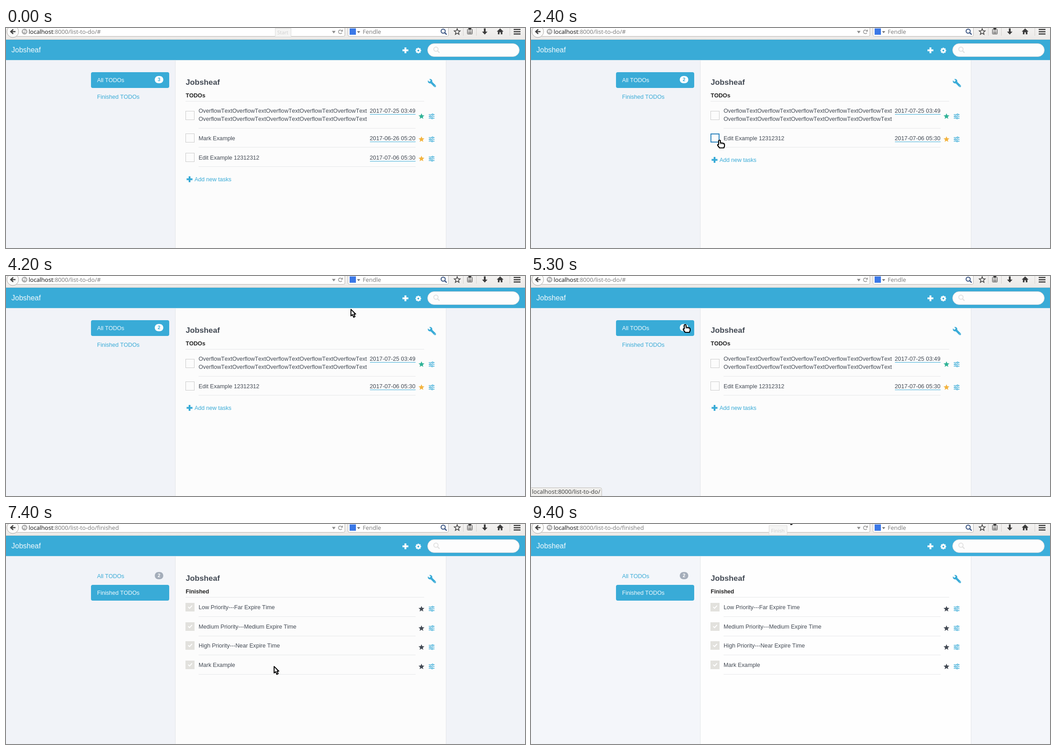
Recreate the animation shown at these times as an HTML page with a canvas. Size 1148 by 488 pixels, loop 9.5 s.

```html
<!DOCTYPE html>
<html lang="en">
<head>
<meta charset="utf-8">
<title>Task list demo</title>
<style>
html, body { margin: 0; width: 100%; height: 100%; overflow: hidden; background: #f1f3f8; }
canvas { display: block; }
</style>
</head>
<body>
<canvas id="stage" width="1148" height="488"></canvas>
<script>
const ctx = document.getElementById('stage').getContext('2d');
const LOOP = 9500, STEP = 100;
const APP = 'Jobsheaf', ENGINE = 'Fendle';
const BLUE = '#39abd7', INK = '#434a54', RULE = '#e6e7e9', WHITE = '#fff';
const PAGE = '"Liberation Sans", Arial, sans-serif';
const CHROME = '"Open Sans", "Noto Sans", sans-serif';
const LONG = 'OverflowText'.repeat(5);

// Pointer hotspot: time, x, y
const PATH = [
  [0, 634, -30], [100, 630, 2], [300, 575, 90], [500, 505, 180], [700, 450, 245],
  [900, 415, 273], [1000, 414, 254], [1100, 414, 247], [1400, 414, 247],
  [1500, 417, 249], [1700, 417, 249], [1800, 417, 247], [1900, 417, 247],
  [2000, 417, 248], [2300, 417, 248], [2400, 417, 249], [2600, 417, 249],
  [2700, 435, 243], [2900, 570, 185], [3200, 792, 80], [3300, 810, 45],
  [3500, 760, 12], [3600, 741, 7], [4000, 741, 7], [4200, 762, 73],
  [4300, 778, 92], [4500, 700, 118], [4700, 565, 120], [5000, 406, 100],
  [5100, 372, 103], [5300, 341, 108], [5600, 310, 126], [5800, 288, 150],
  [6000, 281, 164], [6400, 281, 165], [6700, 360, 195], [7000, 480, 250],
  [7300, 585, 300], [7400, 592, 315], [7600, 545, 345], [7900, 380, 335],
  [8100, 400, 290], [8300, 470, 350], [8400, 520, 190], [8500, 569, 33],
  [8600, 572, -24], [8800, 572, -24], [8900, 568, -17], [9500, 568, -17]
];

function pointerAt(t) {
  const i = Math.max(1, PATH.findIndex(p => p[0] >= t));
  const [t0, x0, y0] = PATH[i - 1], [t1, x1, y1] = PATH[i];
  const k = (t - t0) / (t1 - t0);
  return [Math.round(x0 + (x1 - x0) * k), Math.round(y0 + (y1 - y0) * k)];
}

function rect(x, y, w, h, fill) {
  ctx.fillStyle = fill;
  ctx.fillRect(x, y, w, h);
}

function round(x, y, w, h, r, fill, stroke) {
  ctx.beginPath();
  ctx.roundRect(x, y, w, h, r);
  paint(fill, stroke, 1);
}

function paint(fill, stroke, width) {
  if (fill) { ctx.fillStyle = fill; ctx.fill(); }
  if (stroke) { ctx.strokeStyle = stroke; ctx.lineWidth = width; ctx.stroke(); }
}

function disc(x, y, r, fill, stroke, width = 1) {
  ctx.beginPath();
  ctx.arc(x, y, r, 0, Math.PI * 2);
  paint(fill, stroke, width);
}

function shape(x, y, d, fill, stroke, width = 1) {
  ctx.save();
  ctx.translate(x, y);
  const p = new Path2D(d);
  if (fill) { ctx.fillStyle = fill; ctx.fill(p); }
  if (stroke) { ctx.strokeStyle = stroke; ctx.lineWidth = width; ctx.stroke(p); }
  ctx.restore();
}

function text(s, x, y, size, color, family = PAGE, weight = '') {
  ctx.font = `${weight} ${size}px ${family}`;
  ctx.fillStyle = color;
  ctx.fillText(s, x, y);
}

function star(x, y, r, fill, stroke) {
  ctx.beginPath();
  for (let i = 0; i < 10; i++) {
    const a = -Math.PI / 2 + i * Math.PI / 5, q = i % 2 ? r * 0.45 : r;
    ctx.lineTo(x + q * Math.cos(a), y + q * Math.sin(a));
  }
  ctx.closePath();
  paint(fill, stroke, 1.5);
}

function plus(x, y, r, color) {
  rect(x - r, y - 2, r * 2, 4, color);
  rect(x - 2, y - r, 4, r * 2, color);
}

function sliders(x, y) {
  [[-4, 2], [0, -3], [4, 1]].forEach(([dy, dx]) => {
    rect(x - 6.5, y + dy - 0.6, 13, 1.3, BLUE);
    disc(x + dx, y + dy, 1.6, '#fcfcfc', BLUE, 1.2);
  });
}

function gear(x, y) {
  ctx.save();
  ctx.translate(x, y);
  for (let i = 0; i < 8; i++) {
    rect(-1.5, -6.3, 3, 4, WHITE);
    ctx.rotate(Math.PI / 4);
  }
  ctx.restore();
  disc(x, y, 3.4, null, WHITE, 2.8);
}

function wrench(paper) {
  shape(938, 118, 'M2 2L10.5 10.5', null, BLUE, 4.6);
  disc(938, 118, 5, BLUE);
  disc(949, 129, 2.2, BLUE);
  shape(938, 118, 'M-6 -3L-3 -6L1.5 -1.5L-1.5 1.5Z', paper);
  disc(948.7, 128.7, 0.8, paper);
}

function lens(x, y, r, color, width) {
  disc(x, y, r, null, color, width);
  shape(x + r * 0.7, y + r * 0.7, 'M0 0L4.5 4.5', null, color, width + 0.4);
}

function drawToolbar(url, loading) {
  const g = ctx.createLinearGradient(0, 0, 0, 26);
  g.addColorStop(0, '#f3f2f1');
  g.addColorStop(1, '#ebe9e7');
  rect(0, 0, 1148, 26, g);
  rect(0, 25, 1148, 1, '#d9d3cd');
  round(20.5, -8.5, 729, 27, 3, WHITE, '#b9b5b1');
  round(756.5, -8.5, 222, 27, 3, WHITE, '#b9b5b1');
  disc(15, 8, 13, '#fbfbfa', '#aaa6a2');
  shape(15, 8, 'M6 0H-4M1 -5L-4.5 0L1 5', null, '#444', 2.6);

  disc(41, 8, 5.7, '#b8b8b8', '#8b8b8b');
  shape(41, 8, 'M-4 -2L-1 -4L1 -1L-1 2L-3 1ZM2 -3L4 -1L3 3L1 2Z', '#eee');
  text(url, 50, 13, 13, '#777', CHROME);
  ctx.fillStyle = '#333';
  const host = 'localhost:8000';
  ctx.fillText(host.slice(0, 9), 50, 13);
  shape(725, 9, 'M-4 -2.5H4L0 3Z', '#8a8a8a');
  if (loading) {
    shape(740, 8, 'M-4 -4L4 4M4 -4L-4 4', null, '#888', 2);
  } else {
    ctx.beginPath();
    ctx.arc(739.5, 8.5, 4, 0.5, 5.4);
    paint(null, '#999', 1.7);
    shape(740, 8, 'M5 -5V0H0Z', '#999');
  }

  rect(760, 1, 14, 14, '#3b78e7');
  shape(780, 9, 'M-3.5 -2H3.5L0 2.5Z', '#777');
  text(ENGINE, 789, 13, 13, '#777', CHROME);
  lens(967, 7, 4.6, '#35507f', 2);

  star(998, 8.5, 7, null, '#3d3d3d');
  rect(1011, 0, 1, 17, '#d3d0cd');
  round(1020.5, 2.5, 11, 11, 1, null, '#3d3d3d');
  rect(1023, 0, 6, 4, '#3d3d3d');
  [6, 9, 11].forEach(y => rect(1022, y, 8, 1, '#3d3d3d'));
  rect(1040, 0, 1, 17, '#d3d0cd');
  shape(1059, 8, 'M-2 -7H2V0H6L0 6.5L-6 0H-2Z', '#3d3d3d');
  shape(1093, 8, 'M0 -7L7.5 0H5V6H1.5V1.5H-1.5V6H-5V0H-7.5Z', '#3d3d3d');
  rect(1114, 0, 1, 17, '#d3d0cd');
  [2, 7, 12].forEach(y => rect(1123, y, 15, 2.5, '#3d3d3d'));
}

function drawHeader(color) {
  rect(0, 26, 1148, 45, color);
  rect(0, 71, 1148, 1, '#d3e4ee');
  text(APP, 12, 54, 16, '#f4fafd');
  plus(883.5, 49.5, 6.5, WHITE);
  gear(912, 50);
  round(932.5, 34.5, 203, 29, 14.5, '#fdfdfd', '#cfd3d6');
  lens(951, 47, 4.8, '#e2e2e2', 2);
}

function drawNav(finished, count, hover) {
  if (hover) round(188, 135, 173, 35, 4, '#ebedf0');
  round(188, finished ? 135 : 98, 173, 35, 4, BLUE);
  text('All TODOs', 201.5, 120, 12.6, finished ? BLUE : '#f4fafd');
  text('Finished TODOs', 201.5, 157, 12.6, finished ? '#f4fafd' : BLUE);
  round(329, 106.5, 19, 16, 8, finished ? '#a4adba' : WHITE);
  text(count, 335.5, 118, 10.8, finished ? WHITE : BLUE, PAGE, 'bold');
}

function drawTitle(label, paper) {
  text(APP, 397.5, 126, 17.2, INK, PAGE, 'bold');
  wrench(paper);
  text(label, 397.5, 153.5, 12.6, '#222', PAGE, 'bold');
  rect(397, 162, 528, 1, RULE);
}

function openTask(lines, date, y, box, icon, color, focus) {
  ctx.lineWidth = focus ? 2 : 1;
  ctx.strokeStyle = focus ? '#2a82bd' : '#cbcbcb';
  const o = focus ? 1 : 0.5;
  ctx.strokeRect(397 + o, box + o, 20 - 2 * o, 20 - 2 * o);
  lines.forEach((s, i) => text(s, 426, y + i * 18, 12.65, INK));
  text(date, 804.5, y, 12.8, INK);
  rect(805, y + 3, 101, 1, BLUE);
  star(919, icon, 6.8, color);
  sliders(941.5, icon);
  rect(426, icon === 196 ? 222 : icon + 17, 480, 1, RULE);
}

function drawOpen(marked, focus) {
  const gold = '#f3b33e';
  openTask([LONG, LONG], '2017-07-25 03:49', 188, 184, 196, '#2fb296');
  if (!marked) openTask(['Mark Example'], '2017-06-26 05:20', 249, 234, 247, gold, focus);
  const dy = marked ? 0 : 43;
  openTask(['Edit Example 12312312'], '2017-07-06 05:30', 249 + dy, 234 + dy, 247 + dy, gold, marked && focus);
  plus(406, 292.5 + dy, 6.5, BLUE);
  text('Add new tasks', 417, 296.5 + dy, 12.55, BLUE);
}

function drawDone(styled) {
  const names = ['Low Priority---Far Expire Time', 'Medium Priority---Medium Expire Time',
    'High Priority---Near Expire Time', 'Mark Example'];
  const x = styled ? 426 : 419;
  names.forEach((s, i) => {
    const dy = Math.round(i * (styled ? 42.6 : 43.5));
    if (styled) {
      rect(397, 175 + dy, 20, 19, '#e2e1dd');
      shape(407, 184 + dy, 'M-4 0L-1 3L4.5 -3', null, WHITE, 2);
    } else {
      round(398.5, 179.5 + dy, 11, 10, 2, '#e4e4e4', '#b9b9b9');
      shape(404, 184 + dy, 'M-3 0L-1 3L5 -4', null, '#9b9b9b', 1.8);
    }
    text(s, x, 189 + dy, 12.65, INK);
    star(919, 188.5 + dy, 6.8, INK);
    sliders(941.5, 188 + dy);
    rect(x, (styled ? 205 : 206) + dy, 906 - x, 1, RULE);
  });
}

function drawStatus(s) {
  ctx.font = `13px ${CHROME}`;
  const w = Math.round(ctx.measureText(s).width) + 6;
  round(-3.5, 469.5, w + 3, 25, 4, '#efeeec', '#c3c0bd');
  text(s, 2, 483, 13, '#3c3c3c', CHROME);
}

function drawTag(s, x, y, w, h) {
  round(x + 0.5, y + 0.5, w - 1, h - 1, 0, '#f5f5f4', '#dddcdb');
  text(s, x + 5, y + h - 6, 11, '#cfcfcf', CHROME);
}

function drawPointer(x, y, hand) {
  ctx.lineJoin = 'round';
  if (hand) {
    shape(x, y, 'M-2 1Q0 -1 2 1V5.5L5 6L8 6.5Q11 7 11 10V13L9.5 17H0L-4 11.5Q-5 8.5 -2 9.5Z', WHITE, '#000', 2.2);
    shape(x, y, 'M2 5V9M5 6V9M8 7V9.5', null, '#000', 1);
  } else {
    shape(x, y, 'M1 1V15.5L4.5 12.5L7 18.5L10 17L7.5 11.5H11.5Z', WHITE, '#000', 2);
  }
  ctx.lineJoin = 'miter';
}

function statusAt(t, x, y, overNav) {
  if ((t >= 3900 && t < 4100) || (t >= 6200 && t < 6400)) return 'Waiting for localhost...';
  if (t >= 5200 && t < 6400 && overNav) {
    return 'localhost:8000/list-to-do/' + (y >= 135 ? 'finished' : '');
  }
  return '';
}

function draw(t) {
  const done = t >= 6400, marked = t >= 2400, ending = t >= 9300;
  const paper = ending ? '#fefefe' : '#fcfcfc';
  const [x, y] = pointerAt(t);
  const overNav = x >= 188 && x <= 361 && y >= 98 && y <= 170;
  const overBox = x >= 397 && x <= 417 && y >= 234 && y <= 297;
  const loading = (t >= 3900 && t < 4100) || (t >= 6200 && t < 6400);

  rect(0, 0, 1148, 488, ending ? '#f4f6fa' : '#f1f3f8');
  rect(374, 71, 600, 417, '#e3e5e8');
  rect(375, 71, 598, 417, paper);
  drawToolbar('localhost:8000/list-to-do/' + (done ? 'finished' : '#'), loading);
  drawHeader(ending ? '#3caedb' : BLUE);
  drawNav(done, marked ? '2' : '3', !done && overNav && y >= 135);
  drawTitle(done ? 'Finished' : 'TODOs', paper);
  if (done) drawDone(t >= 6500);
  else drawOpen(marked, t >= 1500 && t < 2700);

  const status = statusAt(t, x, y, overNav);
  if (status) drawStatus(status);
  if (t < 100) drawTag('Start', 595, 0, 36, 20);
  if (ending) drawTag('Finish', 526, 3, 41, 22);
  drawPointer(x, y, overNav || (overBox && !done));
}

ctx.fontKerning = 'none';
const start = performance.now();
function tick() {
  const t = (performance.now() - start) % LOOP;
  draw(Math.floor(t / STEP) * STEP);
  requestAnimationFrame(tick);
}
tick();
</script>
</body>
</html>
```
